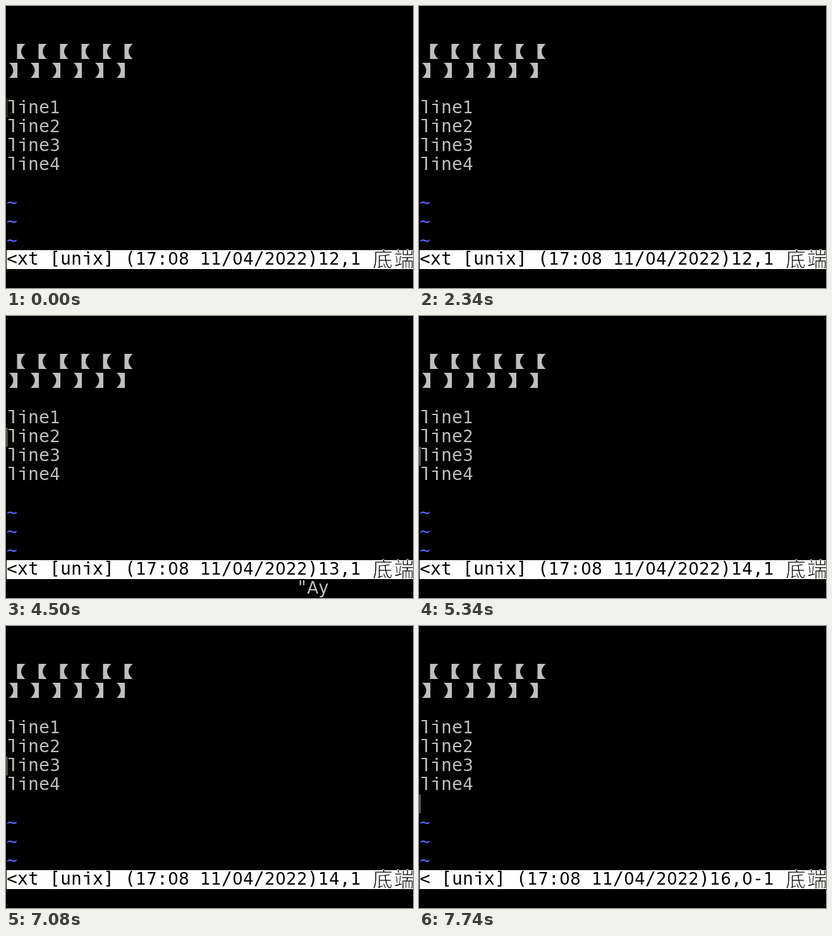
Recreate the animation shown at these times as an HTML page with a canvas. Size 644x447 px, loop 8000 ms.

```html
<!DOCTYPE html>
<html lang="zh">
<head>
<meta charset="utf-8">
<style>
html, body { margin: 0; width: 644px; height: 447px; overflow: hidden; background: #000; }
canvas { display: block; }
</style>
</head>
<body>
<canvas width="644" height="447"></canvas>
<script>
const ctx = document.querySelector('canvas').getContext('2d');
const CELL = 17, ROW = 30, BASE = 23, LOOP = 8000;
const GREY = '#bfbfbf', BLUE = '#6060ff';
const FIRST = 12; // file line shown at y = 147

// [time, cursor line, cursor style, pending keys]
const OFF = 0, SOLID = 1, DOTTED = 2;
const steps = [
  [0, 12, DOTTED, ''], [180, 12, SOLID, ''], [660, 12, OFF, ''],
  [780, 12, SOLID, '"'], [1080, 12, SOLID, '"a'], [1620, 12, OFF, '"a'],
  [1680, 12, SOLID, '"ay'], [1860, 12, SOLID, ''], [2340, 12, OFF, ''],
  [2400, 13, SOLID, ''], [2940, 13, OFF, ''], [3420, 13, SOLID, ''],
  [3600, 13, SOLID, '"'], [4020, 13, SOLID, '"A'], [4500, 13, SOLID, '"Ay'],
  [4680, 13, SOLID, ''], [5160, 13, OFF, ''], [5280, 13, SOLID, '~@k'],
  [5340, 14, SOLID, ''], [5820, 14, SOLID, '"'], [6180, 14, SOLID, '"A'],
  [6720, 14, OFF, '"A'], [6900, 14, SOLID, '"Ay'], [7080, 14, SOLID, ''],
  [7500, 15, SOLID, ''], [7680, 15, SOLID, '~@k'], [7740, 16, SOLID, '']
];

// Stem with a left serif and no foot
function stem(x, base, height) {
  ctx.fillRect(x + 9, base - height, 2.7, height);
  ctx.fillRect(x + 3, base - height, 6, 2);
}

function glyph(ch, x, base) {
  if (ch === 'l') return stem(x, base, 21);
  if (ch === 'i') {
    ctx.fillRect(x + 8.5, base - 21, 3, 3);
    return stem(x, base, 15);
  }
  ctx.font = /[0-9A-Z@]/.test(ch)
    ? '26px "DejaVu Sans", sans-serif'
    : '28px "DejaVu Sans Mono", monospace';
  ctx.fillText(ch, x + CELL / 2, base);
}

function write(text, col, y, color) {
  ctx.fillStyle = color;
  [...text].forEach((ch, i) => glyph(ch, 1 + (col + i) * CELL, y + BASE));
}

// Lenticular bracket; dir 1 opens to the right, -1 to the left
function bracket(x, y, dir) {
  ctx.beginPath();
  ctx.moveTo(x, y);
  ctx.lineTo(x + 13 * dir, y);
  ctx.quadraticCurveTo(x, y + 12, x + 13 * dir, y + 24);
  ctx.lineTo(x, y + 24);
  ctx.fill();
}

// Wide characters, thinned by an outline in the background colour
function writeWide(text, x, base) {
  ctx.font = '300 32px "Noto Sans CJK SC", "Noto Sans CJK", sans-serif';
  ctx.strokeStyle = '#fff';
  ctx.lineWidth = 0.9;
  [...text].forEach((ch, i) => {
    const center = x + (2 * i + 1) * CELL;
    ctx.fillText(ch, center, base);
    ctx.strokeText(ch, center, base);
  });
}

function drawStatus(line) {
  const date = '[unix] (17:08 11/04/2022)';
  ctx.fillStyle = '#fff';
  ctx.fillRect(1, 387, 643, ROW);
  write(line === 16 ? `< ${date}16,0-1` : `<xt ${date}${line},1`, 0, 387, '#000');
  writeWide('底端', 579, 413);
}

function draw(now) {
  const t = now % LOOP;
  const [, line, cursor, keys] = steps.findLast(s => s[0] <= t) || steps[0];
  ctx.fillStyle = '#000';
  ctx.fillRect(0, 0, 644, 447);
  ctx.textAlign = 'center';

  ctx.fillStyle = GREY;
  for (let i = 0; i < 6; i++) {
    bracket(17.5 + i * 34, 60, 1);
    bracket(18 + i * 34, 90, -1);
  }
  for (let i = 0; i < 4; i++) write('line' + (i + 1), 0, 147 + i * ROW, GREY);
  for (let i = 0; i < 3; i++) write('~', 0, 298 + i * ROW, BLUE);
  drawStatus(line);
  write(keys, 27, 417, GREY);

  const top = 147 + (line - FIRST) * ROW;
  ctx.fillStyle = GREY;
  if (cursor === SOLID) ctx.fillRect(1, top, 1, ROW);
  if (cursor === DOTTED) for (let y = 0; y < ROW; y += 2) ctx.fillRect(1, top + y, 1, 1);
}

function tick() {
  draw(performance.now());
  requestAnimationFrame(tick);
}
tick();
</script>
</body>
</html>
```
